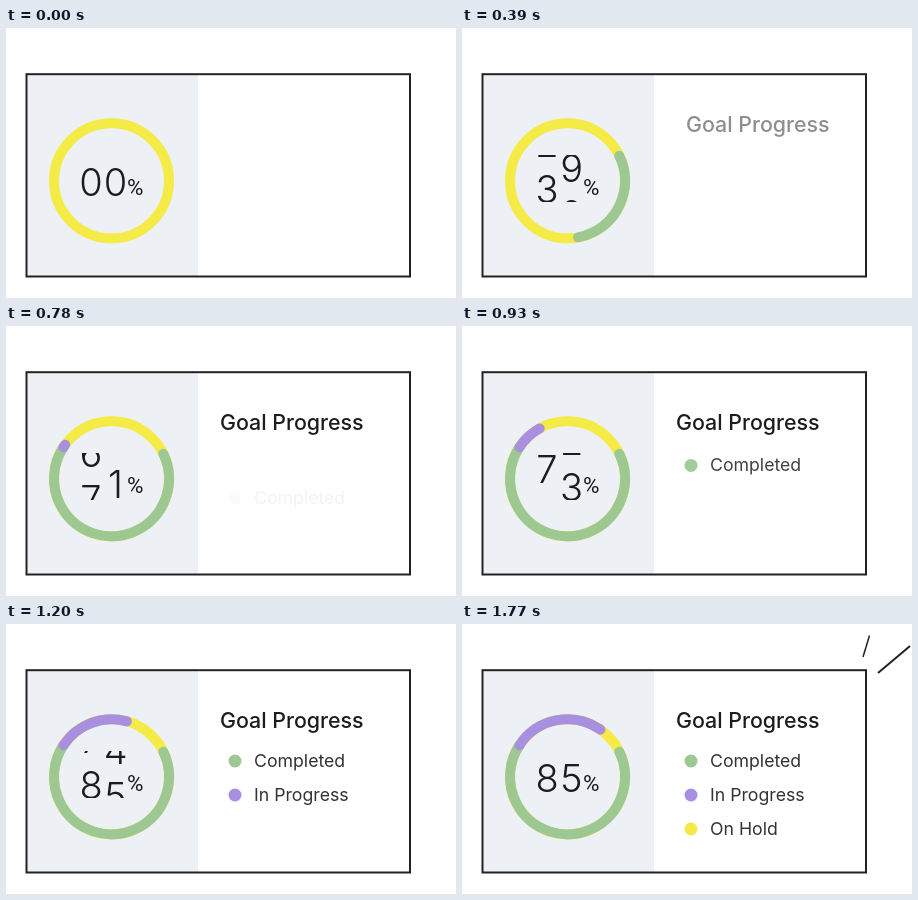
An HTML page for the animation above (1950 ms loop, 450 by 270 pixels).

```html
<!DOCTYPE html>
<html lang="en">
<head>
<meta charset="utf-8">
<title>Goal Progress</title>
<style>
  html, body { margin: 0; width: 100%; height: 100%; overflow: hidden; background: #fff; }
  svg { display: block; width: 450px; height: 270px; font-family: Inter, Roboto, sans-serif; }

  .anim { animation: 1950ms linear infinite both; }
  .arc { fill: none; stroke-width: 10; stroke-linecap: round; }
  .title { font-size: 21.4px; font-weight: 500; fill: #1c1c1e; animation-name: slide, fade; }
  .item { font-size: 17.7px; fill: #333; }
  .digits { font-size: 38px; font-weight: 300; fill: #1c1c1e; text-anchor: middle; }
  .percent { font: 22.5px Roboto, sans-serif; fill: #1c1c1e; }
  .spark { stroke: #222; animation-name: spark; }

  .green { animation-name: green; }
  .purple { animation-name: purple; }
  .tens { animation-name: tens; }
  .ones { animation-name: ones; }
  .first { animation-name: first; }
  .second { animation-name: second; }
  .third { animation-name: third; }

  @keyframes slide {
    0%, 4.615% { transform: translateX(40px); animation-timing-function: cubic-bezier(.333, .667, .667, 1); }
    35.385%, 100% { transform: none; }
  }
  @keyframes fade {
    0%, 4.615% { opacity: 0; }
    35.385%, 100% { opacity: 1; }
  }
  @keyframes green {
    0%, 6.154% { stroke-dasharray: 0 720; visibility: hidden; }
    37.69%, 100% { stroke-dasharray: 239.3 720; visibility: visible; }
  }
  @keyframes purple {
    0%, 39.08% { stroke-dasharray: 0 720; visibility: hidden; }
    67.69%, 100% { stroke-dasharray: 91.6 720; visibility: visible; }
  }
  /* one digit is 46px tall: 8 steps for the tens, 25 for the ones */
  @keyframes tens {
    0% { transform: none; animation-timing-function: cubic-bezier(.335, 0, .192, 1); }
    75.64%, 100% { transform: translateY(-368px); }
  }
  @keyframes ones {
    0% { transform: none; animation-timing-function: cubic-bezier(.335, 0, .192, 1); }
    73.85%, 100% { transform: translateY(-1150px); }
  }
  @keyframes first {
    0%, 39.74% { opacity: 0; transform: translateY(37px); animation-timing-function: cubic-bezier(.333, .667, .667, 1); }
    50.51%, 100% { opacity: 1; transform: none; }
  }
  @keyframes second {
    0%, 52.31% { opacity: 0; transform: translateY(13px); animation-timing-function: cubic-bezier(.333, .667, .667, 1); }
    61.03%, 100% { opacity: 1; transform: none; }
  }
  @keyframes third {
    0%, 64.1% { opacity: 0; transform: translateY(7px); animation-timing-function: cubic-bezier(.333, .667, .667, 1); }
    74.36%, 100% { opacity: 1; transform: none; }
  }
  @keyframes spark {
    0%, 76.92% { stroke-dasharray: 0 2; }
    90.77%, 100% { stroke-dasharray: 1 2; }
  }
</style>
</head>
<body>
<svg viewBox="0 0 450 270">
  <clipPath id="window"><rect x="70" y="127" width="52" height="46.5"/></clipPath>

  <rect x="20" y="46" width="172" height="202" fill="#edf0f5"/>
  <rect x="20.5" y="46.2" width="383.5" height="202.3" fill="none" stroke="#222" stroke-width="2"/>

  <g transform="translate(105.5 152.8)">
    <circle class="arc" r="57.5" stroke="#f5eb46"/>
    <circle class="arc anim green" r="57.5" pathLength="360" stroke="#9dc892" transform="rotate(-25.9)"/>
    <circle class="arc anim purple" r="57.5" pathLength="360" stroke="#a98fdf" transform="rotate(213.4)"/>
  </g>

  <g class="digits" clip-path="url(#window)">
    <g class="anim tens" data-x="85" data-last="8"></g>
    <g class="anim ones" data-x="109.6" data-last="25"></g>
  </g>
  <text class="percent" x="121" y="167">%</text>

  <text class="anim title" x="214" y="103.5">Goal Progress</text>
  <g class="anim item first">
    <circle cx="229" cy="137" r="6.5" fill="#9dc892"/>
    <text x="248" y="143">Completed</text>
  </g>
  <g class="anim item second">
    <circle cx="229" cy="171" r="6.5" fill="#a98fdf"/>
    <text x="248" y="177">In Progress</text>
  </g>
  <g class="anim item third">
    <circle cx="229" cy="205" r="6.5" fill="#f5eb46"/>
    <text x="248" y="211">On Hold</text>
  </g>

  <path class="anim spark" d="M401 33L407.5 11.5" pathLength="1" stroke-width="1.5"/>
  <path class="anim spark" d="M416 49L448 22" pathLength="1" stroke-width="2"/>
</svg>
<script>
  const PITCH = 46, BASELINE = 168;

  for (const column of document.querySelectorAll("[data-last]")) {
    for (let i = 0; i <= column.dataset.last; i++) {
      const digit = document.createElementNS("http://www.w3.org/2000/svg", "text");
      digit.setAttribute("x", column.dataset.x);
      digit.setAttribute("y", BASELINE + i * PITCH);
      digit.textContent = i % 10;
      column.append(digit);
    }
  }
</script>
</body>
</html>
```
